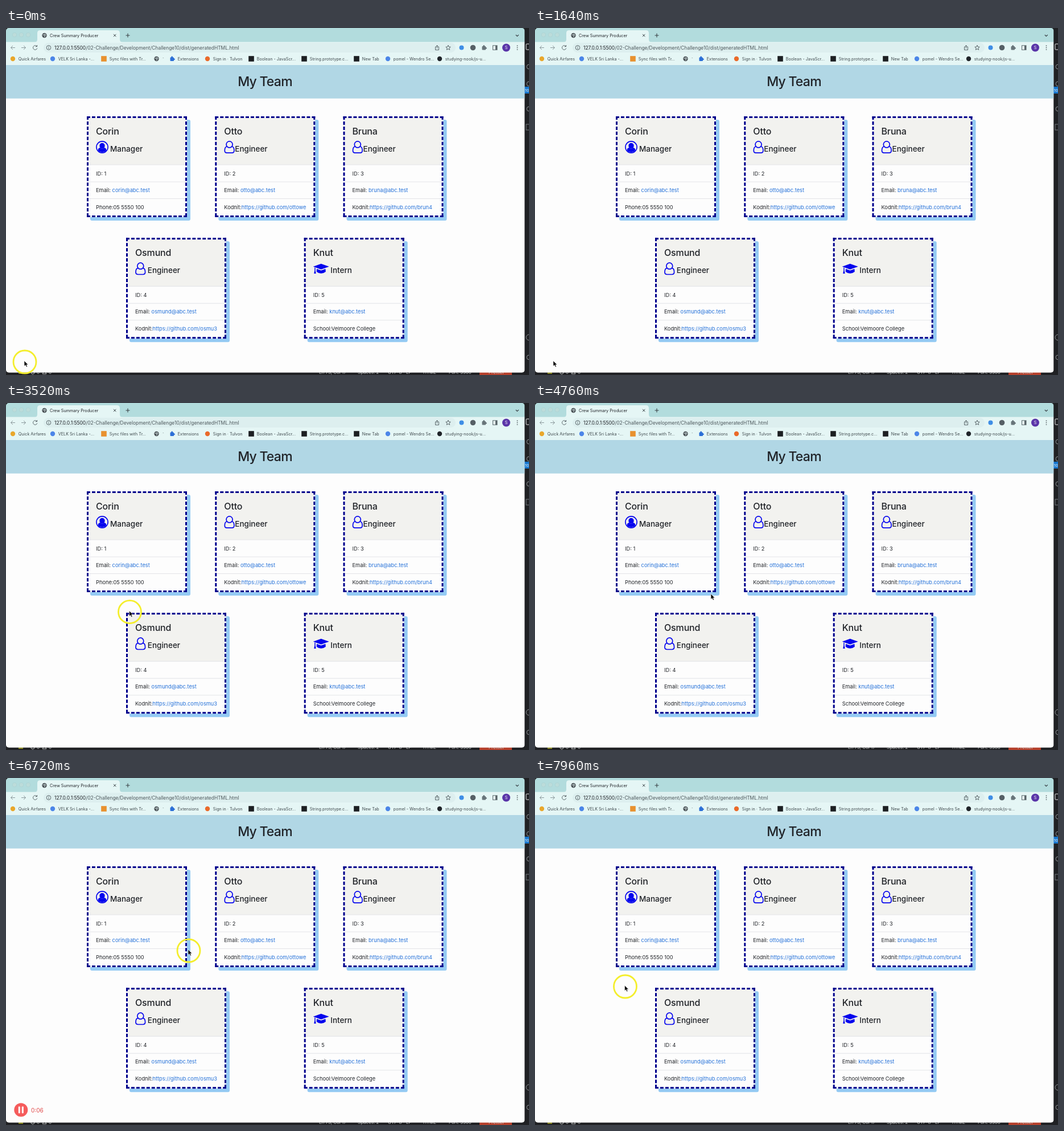
An HTML page that plays this animation: 919 px wide and 609 px high, repeating every 8000 ms.

```html
<!DOCTYPE html>
<html lang="en">
<head>
<meta charset="utf-8">
<title>My Team</title>
<style>
html, body { margin: 0; width: 100%; height: 100%; overflow: hidden; background: #202124; }
svg { display: block; width: 919px; height: 609px; }
text { font-family: Inter, Roboto, sans-serif; font-optical-sizing: none; white-space: pre; }
</style>
</head>
<body>
<svg id="stage" viewBox="0 0 919 609"></svg>
<script>
const LOOP = 8000;
const NAVY = '#00008b', BLUE = '#0505ee', LINK = '#2370d8', INK = '#202328', GREY = '#596569';

const rect = (x, y, w, h, fill, more = '') =>
  `<rect x="${x}" y="${y}" width="${w}" height="${h}" fill="${fill}" ${more}/>`;
const dot = (x, y, r, fill, more = '') =>
  `<circle cx="${x}" cy="${y}" r="${r}" fill="${fill}" ${more}/>`;
const line = (d, color = GREY, w = 1, more = '') =>
  `<path d="${d}" fill="none" stroke="${color}" stroke-width="${w}" ${more}/>`;
const text = (x, y, size, str, fill = INK, more = '') =>
  `<text x="${x}" y="${y}" font-size="${size}" fill="${fill}" ${more}>${str}</text>`;
const at = (x, y, body) => `<g transform="translate(${x} ${y})">${body}</g>`;
const link = str => `<tspan fill="${LINK}">${str}</tspan>`;

const globe = (x, y) => dot(x, y, 4.2, '#4b5357') +
  line(`M${x - 3} ${y - 1}h2.5l1.5 2-1 2M${x + 1} ${y - 3}l-.5 1.6 2.5 1`, '#dfeeee', 1);
const puzzle = (x, y, fill) => rect(x - 3.5, y - 2.5, 6.5, 6.5, fill, 'rx="1"') +
  dot(x - .3, y - 3, 1.5, fill) + dot(x + 3.3, y + .8, 1.5, fill);

// Editor window peeking out behind the browser
function editor() {
  const status = [[550, 'Ln 73, Col 17'], [618, 'Spaces: 2'], [671, 'UTF-8'], [703, 'LF'],
    [733, 'HTML'], [778, 'Port: 5500'], [848, 'Prettier']];
  const icons = [68, 98, 142].map(y => dot(919, y, 4, 'none', 'stroke="#8a8d90"')).join('');
  return rect(0, 0, 919, 609, '#202124') +
    rect(832, 600, 57, 9, '#b5402c') + rect(22, 603, 8, 4, '#8c8a20') +
    status.map(([x, s]) => text(x, 607, 8, s, '#c9cccd')).join('') +
    dot(47, 604, 3.3, 'none', 'stroke="#c9cccd"') + text(54, 607, 8, '0', '#c9cccd') +
    line('M64 607l3.5-6 3.5 6z', '#c9cccd') + text(75, 607, 8, '0', '#c9cccd') +
    rect(914, 28, 9, 10, 'none', 'stroke="#e8e8e8" rx="1"') + icons +
    rect(914, 169, 8, 10, 'none', 'stroke="#777b7e"') +
    rect(911, 103, 8, 12, '#1677cf') + text(912, 112, 6.5, '10', '#fff') +
    dot(919, 543, 5, 'none', 'stroke="#8a8d90"') + dot(919, 578, 4, 'none', 'stroke="#8a8d90"');
}

function tabStrip() {
  return rect(0, 0, 911.5, 25, '#b2dcdd') +
    [15, 27, 39].map(x => dot(x, 12, 3.8, '#bcdcda', 'stroke="#a7cfd0" stroke-width=".6"')).join('') +
    `<path d="M50 25q5 0 5-5V9q0-5 5-5H195q5 0 5 5v11q0 5 5 5z" fill="#e5f6f5"/>` +
    globe(67.5, 13) + text(77, 16, 7.2, 'Crew Summary Producer') +
    line('M189 10.8l4.4 4.4m0-4.4l-4.4 4.4', '#384044') +
    line('M210.5 13h7m-3.5-3.5v7', '#384044', 1.1) +
    line('M895.8 12l2.5 2.5 2.5-2.5', '#384044', 1.1);
}

function toolbar() {
  const path = '/02-Challenge/Development/Challenge10/dist/generatedHTML.html';
  return rect(0, 24.5, 911.5, 40.5, '#e5f6f5') +
    rect(66, 26, 724, 17, '#ddefef', 'rx="8.5"') +
    line('M16 34.5H8.5m3.4-3.4l-3.4 3.4 3.4 3.4', '#8b999c') +
    line('M27 34.5h7.5m-3.4-3.4l3.4 3.4-3.4 3.4', '#8b999c') +
    line('M54 32a3.7 3.7 0 1 0 .8 3.5M54.6 30v2.6H52', GREY) +
    dot(75, 34.5, 3.8, 'none', `stroke="${GREY}"`) + line('M75 34v2.6M75 32v1') +
    text(85, 37.5, 8.45, `127.0.0.1:5500<tspan fill="#4d585c">${path}</tspan>`) +
    line('M756 33h-1.5v5.5h6V33H759M757.500 36v-5.500m-2 2l2-2 2 2') +
    line('M777 30.2l1.2 2.8 3 .3-2.300 2 .7 3-2.600-1.600-2.600 1.600 .7-3-2.300-2 3-.3z') +
    dot(800.5, 34.5, 4, '#3f8ee6') + dot(820.5, 34.5, 4.8, '#566066') +
    puzzle(840, 34.5, '#68757a') +
    rect(855.5, 30.8, 7.5, 7.5, 'none', `stroke="${GREY}"`) + rect(860, 31, 3, 7, GREY) +
    dot(879, 34.5, 7, '#5a35a8') +
    text(879, 37, 7, 'S', '#fff', 'text-anchor="middle"') +
    [31.2, 34.5, 37.8].map(y => dot(898.5, y, .9, GREY)).join('');
}

function bookmarks() {
  const items = [[12, '#e9a72c', 'Quick Airfares'], [82, '#4c86e8', 'VELK Sri Lanka -...'],
    [292, '', 'Extensions'], [354, '#ea6a2a', 'Sign in · Tulvon'],
    [671, '#4c86e8', 'pomel - Wendro Se...'], [762, '#20252a', 'studying-nook/js-u...']];
  const square = [[172, '#e8912f', 'Sync files with Tr...'], [431, '#1c1f22', 'Boolean - JavaScr...'],
    [524, '#1c1f22', 'String.prototype.c...'], [616, '#1c1f22', 'New Tab']];
  const label = (x, s) => text(x + 9.8, 56.5, 7.2, s, '#3f494d');
  return items.map(([x, c, s]) => (c ? dot(x, 54, 4.2, c) : puzzle(x, 54, '#2c6fd6')) + label(x, s)).join('') +
    square.map(([x, c, s]) => rect(x - 4.8, 49.2, 9.6, 9.6, c) + label(x, s)).join('') +
    globe(264.5, 54) + text(275, 57, 7.2, '`', '#3f494d');
}

const icons = {
  manager: dot(11, 11, 10.1, 'none', `stroke="${BLUE}" stroke-width="1.6"`) +
    `<ellipse cx="11" cy="8.700" rx="4.700" ry="5" fill="${BLUE}"/>
     <path d="M3.500 16.500Q4 12.300 7.200 12q3.800 3 7.600 0 3.200.3 3.700 4.500Q15.500 20 11 20t-7.500-3.500z" fill="${BLUE}"/>`,
  engineer: dot(9.3, 6.4, 5.5, 'none', `stroke="${BLUE}" stroke-width="1.700"`) +
    line('M5 10C1.800 10.300 1 13.500 1 17.300 1 20 2.500 21.200 4.800 21.200h9c2.300 0 3.800-1.200 3.800-3.900 0-3.800-.8-7-4-7.300', BLUE, 1.7),
  intern: `<path d="M0 7.500L14 2.500 28 7.500 14 12.500zM6.300 11.500L14 14.200l7.700-2.700.4 5q-3.600 3-8.100 3t-8.100-3zM2.500 9l1.500.6v5l1 5H1.500l1-5z" fill="${BLUE}"/>`
};

const roleGap = { manager: 41, engineer: 35, intern: 46.5 };

function card(x, y, name, kind, role, id, last, gap = roleGap[kind]) {
  const mail = `Email: ${link(name.toLowerCase() + '@abc.test')}`;
  const dash = 'stroke-dasharray="6 2.95"';
  return at(x, y,
    rect(6, 6, 176, 177, '#94caf3', 'rx="3"') +
    rect(0, 0, 176, 177, '#fdfdfd', 'rx="3"') +
    rect(3, 3, 170, 82, '#f2f2ef') +
    [85, 115, 144.5].map(v => line(`M3 ${v}H173`, '#dddfe2', .8)).join('') +
    line('M0 1.500H176M0 175.500H176', NAVY, 3, dash) +
    line('M1.500 0V177M174.500 0V177', NAVY, 3, dash) +
    text(16, 32, 16, name, INK, 'font-weight="500" letter-spacing="-.15"') +
    at(16, 43, icons[kind]) +
    text(gap, 62, 13.5, role, INK, 'font-weight="500"') +
    [`ID: ${id}`, mail, last].map((s, i) => text(16, 103.5 + i * 29.7, 9.25, s)).join(''));
}

const repo = user => `Kodnit:${link('https://github.com/' + user)}`;

function page() {
  return rect(0, 65, 911.5, 540, '#fdfdfd') + rect(0, 65, 911.5, 58.7, '#b1d7e5') +
    text(455, 101.5, 23, 'My Team', INK, 'font-weight="500" letter-spacing="-.75" text-anchor="middle"') +
    card(142, 155, 'Corin', 'manager', 'Manager', 1, 'Phone:05 5550 100') +
    card(367.3, 155, 'Otto', 'engineer', 'Engineer', 2, repo('ottowe')) +
    card(592.5, 155, 'Bruna', 'engineer', 'Engineer', 3, repo('brun4')) +
    card(211, 368.3, 'Osmund', 'engineer', 'Engineer', 4, repo('osmu3'), 37.8) +
    card(523.7, 368.3, 'Knut', 'intern', 'Intern', 5, 'School:Velmoore College');
}

const recorder = dot(26.3, 582.5, 12, '#f55c5c') +
  rect(21.8, 576.5, 3, 12, '#fff', 'rx="1"') + rect(27.800, 576.5, 3, 12, '#fff', 'rx="1"') +
  text(44, 586.5, 10, '0:06', '#e04848');

const stage = document.getElementById('stage');
stage.innerHTML =
  `<clipPath id="win"><rect x="0" y="0" width="911.5" height="604.8" rx="5"/></clipPath>` +
  editor() +
  `<g clip-path="url(#win)">${tabStrip()}${toolbar()}${bookmarks()}${page()}</g>
   <g id="recorder">${recorder}</g>
   <g id="pointer">
     <circle id="ring" cx="1" cy="2" r="20" fill="none" stroke="#f4ee2c" stroke-width="2.800"/>
     <path d="M0 0v9.600l2.200-2 1.600 3.500 1.700-.8-1.500-3.400h3z" fill="#0b0b0b" stroke="#fff" stroke-width=".6"/>
   </g>`;

const [recEl, pointer, ring] = ['recorder', 'pointer', 'ring'].map(id => document.getElementById(id));

// Keys: time, then the values at that time
const MOVES = [[0, 32, 584], [2050, 32, 584], [2680, 125, 404], [3300, 200, 370], [4200, 309, 335],
  [5200, 309, 335], [5700, 376, 306], [6300, 376, 306], [6720, 320, 301], [7450, 300, 294],
  [7960, 157.500, 364], [8000, 157.500, 364]];
const GLOW = [[0, 1], [900, 1], [1200, 0], [2050, 0], [2150, 1], [4350, 1], [4600, 0],
  [5200, 0], [5350, 1], [5700, 1], [5840, .8], [6000, .8], [6300, 1], [8000, 1]];

function sample(keys, t) {
  const i = keys.findIndex(k => k[0] > t);
  const a = keys[i - 1], b = keys[i];
  const u = (t - a[0]) / (b[0] - a[0]);
  const e = u * u * (3 - 2 * u);
  return a.slice(1).map((v, n) => v + (b[n + 1] - v) * e);
}

function draw(t) {
  const [x, y] = sample(MOVES, t);
  pointer.setAttribute('transform', `translate(${x} ${y})`);
  ring.setAttribute('opacity', sample(GLOW, t)[0]);
  recEl.setAttribute('visibility', t >= 6600 && t < 6900 ? 'visible' : 'hidden');
}

function tick() {
  draw(performance.now() % LOOP);
  requestAnimationFrame(tick);
}
tick();
</script>
</body>
</html>
```
